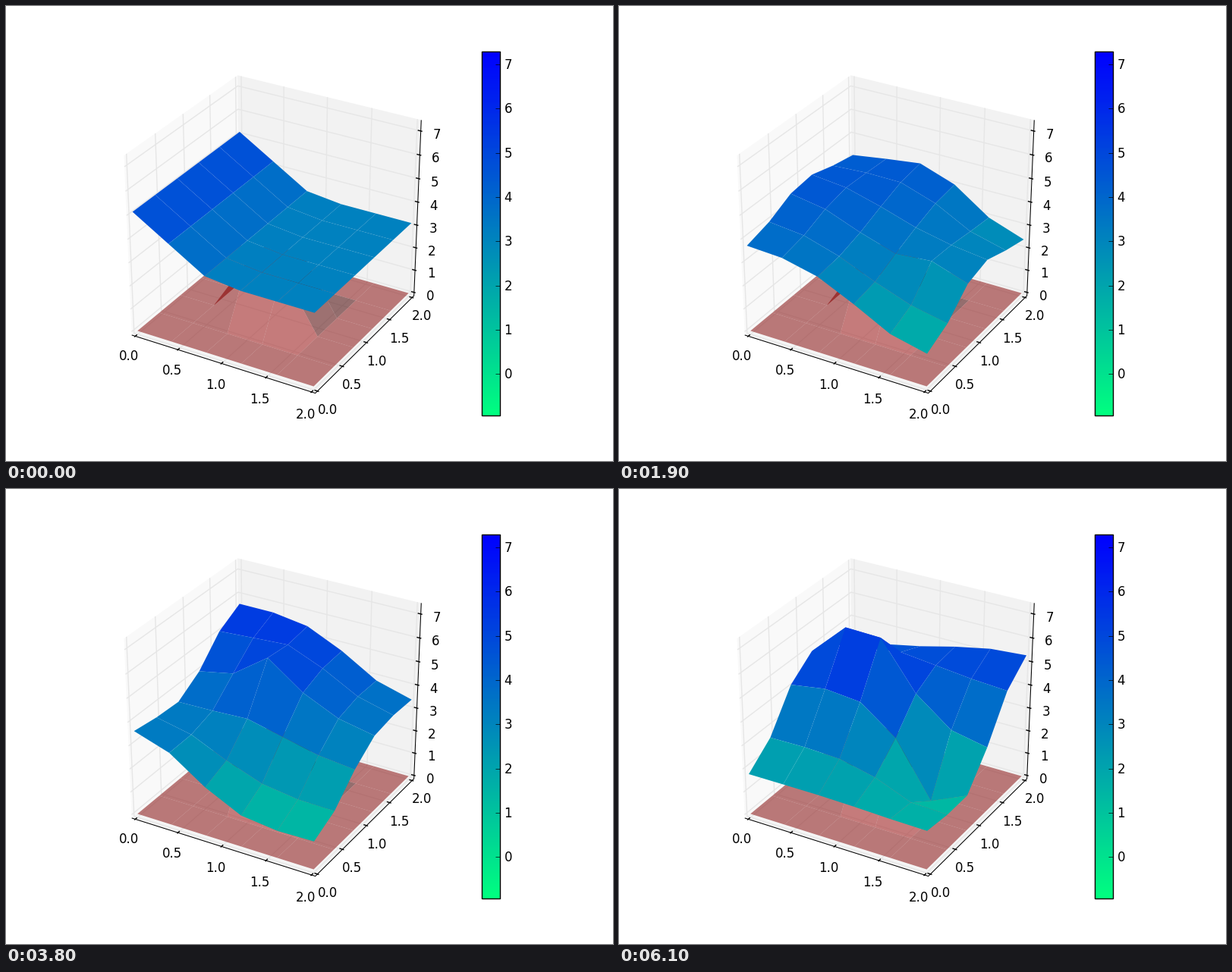
A matplotlib script for the animation above (6.2 s loop, 800 by 600 pixels).

```python
import numpy as np
import matplotlib.pyplot as plt
from matplotlib.animation import FuncAnimation
from matplotlib.collections import LineCollection, PolyCollection

plt.rcParams["font.family"] = "DejaVu Sans"

FRAMES, INTERVAL = 62, 100
SIZE, Z_TOP = 2.0, 7.3            # extent of the floor and of the z axis
LOW, HIGH = -0.94, 7.29           # colour range
CMAP = plt.get_cmap("winter_r")

# Perspective camera: azimuth -60, elevation 30, distance 10
AZIM, ELEV, DIST = np.radians(-60), np.radians(30), 10
RIGHT = np.array([-np.sin(AZIM), np.cos(AZIM), 0])
UP = np.array([-np.cos(AZIM) * np.sin(ELEV), -np.sin(AZIM) * np.sin(ELEV), np.cos(ELEV)])
TOWARD = np.array([np.cos(AZIM) * np.cos(ELEV), np.sin(AZIM) * np.cos(ELEV), np.sin(ELEV)])
SX, SY = 496 / 0.185, 480 / 0.185
CX, CY = 100 + 0.095 * SX, 540 - 0.095 * SY


def project(x, y, z):
    """Screen points and distances from the camera."""
    parts = np.broadcast_arrays(x, y, z)
    d = np.stack(parts, axis=-1) / [SIZE, SIZE, Z_TOP] - 0.5
    depth = DIST - d @ TOWARD
    points = np.stack([CX + SX * (d @ RIGHT) / depth,
                       CY - SY * (d @ UP) / depth], axis=-1)
    return points, depth


N = 6
STEP = SIZE / (N - 1)
GX, GY = np.meshgrid(np.linspace(0, SIZE, N), np.linspace(0, SIZE, N))


def corners(a):
    return np.stack([a[:-1, :-1], a[:-1, 1:], a[1:, 1:], a[1:, :-1]], axis=2)


def mesh(z):
    """Cell outlines from far to near, with the order used."""
    points, depth = project(GX, GY, z)
    quads = corners(points).reshape(-1, 4, 2)
    order = np.argsort(-corners(depth).mean(axis=2).ravel(), kind="stable")
    return quads[order], order


def modes(count):
    """Standing waves between two walls, one column per mode."""
    return np.cos(np.outer(np.linspace(0, np.pi, count), np.arange(3)))


BLEND = modes(N) @ np.linalg.inv(modes(3))


def swell(front, middle, back, *humps):
    """Water through 3 x 3 heights, with local humps (column, row, height)."""
    z = BLEND @ np.array([front, middle, back]) @ BLEND.T
    for col, row, height in humps:
        z += height * np.exp(-2 * ((GX / STEP - col)**2 + (GY / STEP - row)**2))
    return z


def water_keys():
    """Times and surfaces the water passes through."""
    return zip(
        (0, 3.12 + np.maximum(0, 2 - 2.285 * GX)),
        (12, swell((2.65, 3.3, 5.1), (3.5, 3.1, 4.6), (3.35, 3.85, 3.8), (3, 2, -1))),
        (19, swell((3.7, 2.95, 1.4), (4.6, 3.55, 2.95), (4.1, 4.35, 2.4), (4, 2, 0.5))),
        (29, swell((4.75, 3.6, 4.6), (2.65, 4.45, 4.75), (1.3, 2.35, 3), (3, 2, 0.3))),
        (38, swell((3.6, 1.65, 1.2), (3.6, 3.85, 3.05), (5.6, 5.1, 3.4), (2, 3, 1))),
        (53, swell((3.35, 3.95, 5.15), (2.75, 4, 4.05), (1.6, 2.1, 4.35), (3, 2, 0.95))),
        (61, swell((1.75, 1.75, 1.65), (4.65, 4.3, 2.15), (4.1, 4.7, 5.3),
                   (1.5, 3, 2.2), (4, 2, -1.4))))


TIMES, POSES = map(np.array, water_keys())
SPEEDS = np.gradient(POSES, TIMES, axis=0)
SPEEDS[0] = 0


def water_height(frame):
    """Cubic Hermite motion through the poses."""
    k = min(np.searchsorted(TIMES, frame, side="right") - 1, len(TIMES) - 2)
    span = TIMES[k + 1] - TIMES[k]
    t = (frame - TIMES[k]) / span
    ease = t * t * (3 - 2 * t)
    return (POSES[k] * (1 - ease) + POSES[k + 1] * ease
            + span * t * (1 - t) * ((1 - t) * SPEEDS[k] - t * SPEEDS[k + 1]))


fig = plt.figure(figsize=(8, 6), dpi=100, facecolor="white")
ax = fig.add_axes([0, 0, 1, 1])
ax.axis("off")


def path3d(*points):
    return project(*np.array(points, dtype=float).T)[0]


def add_lines(paths, color, width, zorder):
    ax.add_collection(LineCollection(paths, colors=color, linewidths=width,
                                     zorder=zorder), autolim=False)


def add_text(x, y, text, ha="center"):
    ax.text(x, y + 6, text, ha=ha, va="baseline", fontsize=12, color="black")


# Box with panes, grid and axes
A, B = -SIZE / 48, SIZE * 49 / 48
ZA, ZB = -Z_TOP / 48, Z_TOP * 49 / 48
panes = [
    path3d((A, A, ZA), (A, B, ZA), (A, B, ZB), (A, A, ZB)),
    path3d((A, B, ZA), (B, B, ZA), (B, B, ZB), (A, B, ZB)),
    path3d((A, A, ZA), (B, A, ZA), (B, B, ZA), (A, B, ZA)),
]
ax.add_collection(PolyCollection(panes, facecolors=["0.975", "0.95", "0.9625"],
                                 linewidths=0, zorder=1), autolim=False)

flat_ticks = np.arange(0, 2.1, 0.5)
z_ticks = np.arange(8)
grid = [path3d((t, A, ZA), (t, B, ZA), (t, B, ZB)) for t in flat_ticks]
grid += [path3d((B, t, ZA), (A, t, ZA), (A, t, ZB)) for t in flat_ticks]
grid += [path3d((A, A, t), (A, B, t), (B, B, t)) for t in z_ticks]
add_lines(grid, "0.9", 1, 2)

axes_path = path3d((A, A, ZA), (B, A, ZA), (B, B, ZA), (B, B, ZB))
add_lines([axes_path], "black", 0.75, 3)

OUT, IN = SIZE / 120, SIZE / 60
marks = [path3d((t, A - OUT, ZA), (t, A + IN, ZA)) for t in flat_ticks]
marks += [path3d((B + OUT, t, ZA), (B - IN, t, ZA)) for t in flat_ticks]
marks += [path3d((B + OUT, B, t), (B - IN, B, t)) for t in z_ticks]
add_lines(marks, "black", 1, 3)

for t in flat_ticks:
    x, y = path3d((t, A, ZA))[0]
    add_text(x - 8, y + 26 + 1.5 * t, f"{t:.1f}")
    x, y = path3d((B, t, ZA))[0]
    add_text(x + 13, y + 24, f"{t:.1f}")
for t in z_ticks:
    x, y = path3d((B, B, t))[0]
    add_text(x + 21, y + 4, str(t))

# Submerged mound, lit from the near left
mound = np.zeros((N, N))
mound[2:4, 2:4] = 2.4
slope_x = (mound[:-1, 1:] - mound[:-1, :-1]) / STEP
slope_y = (mound[1:, :-1] - mound[:-1, :-1]) / STEP
light = ((slope_x + slope_y + 0.5) / np.sqrt(slope_x**2 + slope_y**2 + 1)).ravel()
shade = 0.5 + 0.5 * (light - light.min()) / np.ptp(light)
quads, order = mesh(mound)
brown = np.array([165, 42, 42]) / 255
ax.add_collection(PolyCollection(quads, facecolors=shade[order, None] * brown,
                                 alpha=0.6, linewidths=0, zorder=4), autolim=False)

# Colour bar
BAR_L, BAR_R, BAR_T, BAR_B = 627, 651, 60, 540
ax.imshow(np.linspace(1, 0, 256)[:, None], cmap=CMAP, aspect="auto",
          extent=(BAR_L, BAR_R, BAR_B, BAR_T), interpolation="nearest", zorder=4)
ax.add_patch(plt.Rectangle((BAR_L, BAR_T), BAR_R - BAR_L, BAR_B - BAR_T,
                           fill=False, edgecolor="black", linewidth=1, zorder=6))
bar_marks = []
for t in z_ticks:
    y = BAR_B - (BAR_B - BAR_T) * (t - LOW) / (HIGH - LOW)
    bar_marks.append([(BAR_R - 5.6, y), (BAR_R, y)])
    add_text(BAR_R + 5.6, y, str(t), ha="left")
add_lines(bar_marks, "black", 0.5, 6)
ax.set(xlim=(0, 800), ylim=(600, 0))

water = PolyCollection([], linewidths=0, cmap=CMAP, zorder=5)
water.set_clim(LOW, HIGH)
ax.add_collection(water, autolim=False)


def update(frame):
    z = water_height(frame)
    quads, order = mesh(z)
    water.set_verts(quads)
    water.set_array(corners(z).mean(axis=2).ravel()[order])
    return [water]


anim = FuncAnimation(fig, update, frames=FRAMES, interval=INTERVAL,
                     repeat=True, repeat_delay=0, blit=False)
plt.show()
```
